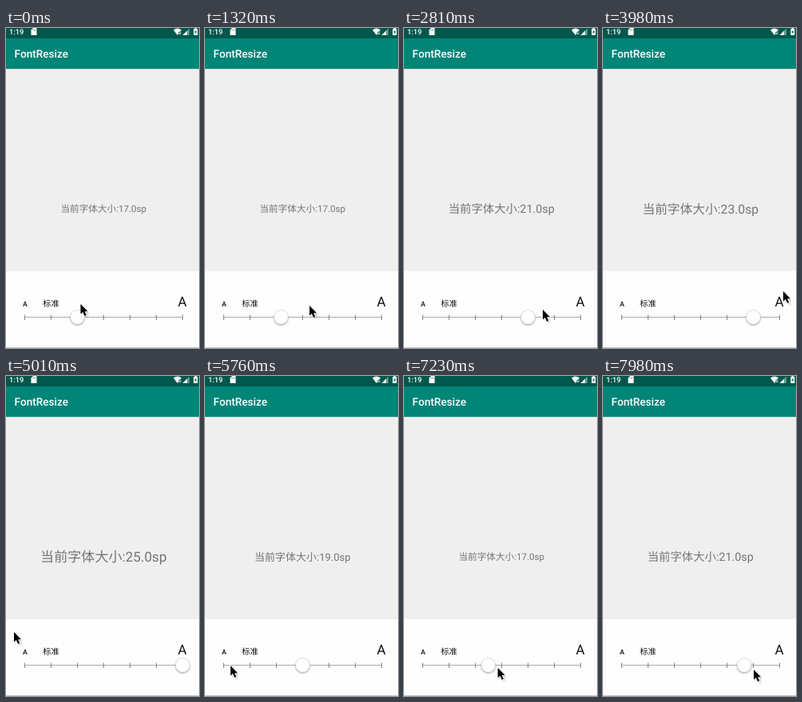
An HTML page for the animation above (8000 ms loop, 242x400 px).

```html
<!DOCTYPE html>
<html lang="zh-CN">
<head>
<meta charset="utf-8">
<title>FontResize</title>
<style>
html, body { margin: 0; width: 100%; height: 100%; overflow: hidden; background: #fefefe; }
svg { display: block; width: 242px; height: 400px; }
text { font-family: Roboto, "Noto Sans CJK SC", "Noto Sans CJK", sans-serif; text-rendering: geometricPrecision; }
</style>
</head>
<body>
<svg viewBox="0 0 242 400">
  <defs>
    <filter id="soft" x="-50%" y="-50%" width="200%" height="200%">
      <feGaussianBlur stdDeviation="0.9"/>
    </filter>
  </defs>
  <rect width="242" height="400" fill="#fefefe"/>
  <rect y="51" width="242" height="253" fill="#efefef"/>
  <rect y="51" width="242" height="1" fill="#dcdcdc"/>
  <rect y="13" width="242" height="38" fill="#008577"/>
  <rect width="242" height="13" fill="#00574b"/>
  <rect y="399" width="242" height="1" fill="#c8c8c8"/>

  <g fill="#fff">
    <text x="4" y="8" font-size="9.3" font-weight="500">1:19</text>
    <path d="M34 0H38.5V9H31.5V2.5Z"/>
    <path d="M33.8 1.6V3.2M35.4 1.6V3.2M37 1.6V3.2" stroke="#00574b" stroke-width=".6"/>
    <path d="M210 2.5Q215 -1.4 220 2.5L215 9Z"/>
    <path d="M216.7 5L219.7 8.5M219.7 5L216.7 8.5" stroke="#00574b" stroke-width="1.8"/>
    <path d="M217 5.4L219.4 8.2M219.4 5.4L217 8.2" stroke="#fff" stroke-width=".8"/>
    <path d="M221.5 9L230 .5V9Z" opacity=".4"/>
    <path d="M221.5 9L227 3.5V9Z"/>
    <path d="M235.3 1H236.6V0H239V1H240.3V9H235.3Z"/>
    <path d="M238.3 2.4L236.4 5.4H237.6V7.6L239.4 4.6H238.3Z" fill="#00574b"/>
    <text x="10.6" y="37" font-size="13.6" font-weight="500">FontResize</text>
  </g>

  <text id="label" x="122.3" text-anchor="middle" fill="#757575"></text>

  <g text-anchor="middle" fill="#111">
    <text x="24" y="348" font-size="8.8" font-weight="500">A</text>
    <text x="56.5" y="348" font-size="10.2">标准</text>
    <text x="221" y="348" font-size="17">A</text>
  </g>
  <g fill="none" stroke-width="1">
    <path id="line" stroke="#aaa"/>
    <path id="ticks" stroke="#858585"/>
  </g>
  <g id="thumb">
    <circle cy="1" r="9" opacity=".4" filter="url(#soft)"/>
    <circle r="8.8" fill="#fefefe" stroke="#d4d4d4" stroke-width=".5"/>
  </g>
  <g id="cursor">
    <path d="M1.5 1.5V14L4.5 12 7 17 9.5 16 7.5 11H11Z" opacity=".25" filter="url(#soft)"/>
    <path d="M0 0V12.6L2.9 10 5.1 15 7.2 14.1 5.1 9.2H9Z" stroke="#fff" stroke-width="1.6" paint-order="stroke"/>
  </g>
</svg>
<script>
const LOOP = 8000, STEP = 147.7;
const LEFT = 23.5, GAP = 33, STOPS = 7, AXIS = 361.5;
const MIN_SP = 13, PX_PER_SP = 0.684;
const SLIDE = 2, DRAG_OFFSET = 12;

const $ = id => document.getElementById(id);
const label = $('label'), thumb = $('thumb'), cursor = $('cursor');

const clamp = (v, lo, hi) => Math.min(hi, Math.max(lo, v));
const linear = f => f;
const easeOut = f => 1 - (1 - f) ** 3;
const easeInOut = f => (1 - Math.cos(Math.PI * f)) / 2;
const stopX = i => LEFT + GAP * i;
const place = (el, x, y) => el.setAttribute('transform', `translate(${x} ${y})`);

// Times below are counted in steps.
const hop = (from, to, x, y, ease = easeOut) => ({ from, to, x, y, ease });
const drag = hop(43, 54, 189, 367, linear);
const hops = [
  hop(0, 2, 102, 347), hop(4, 7, 131, 347), hop(11, 13, 163, 351),
  hop(17, 19, 174, 352), hop(23, 27, 226, 329), hop(29, 34, 10, 320),
  hop(35, 38, 32, 362), drag
];
const taps = [8.45, 14, 20, 28, 38];

function pointerAt(n) {
  let x = 93.5, y = 345;
  for (const h of hops) {
    const f = h.ease(clamp((n - h.from) / (h.to - h.from), 0, 1));
    x += (h.x - x) * f;
    y += (h.y - y) * f;
  }
  return { x, y };
}

// A tap slides the thumb to the nearest stop; a drag carries it along.
function sliderAt(n) {
  if (n >= drag.from) return Math.max(0, (pointerAt(n).x - DRAG_OFFSET - LEFT) / GAP);
  let stop = 2;
  for (const tap of taps) {
    const goal = clamp(Math.round((pointerAt(tap).x - LEFT) / GAP), 0, STOPS - 1);
    stop += (goal - stop) * easeInOut(clamp((n - tap) / SLIDE, 0, 1));
  }
  return stop;
}

function draw(ms) {
  const n = Math.floor((ms % LOOP + 12) / STEP);
  const stop = sliderAt(n), pointer = pointerAt(n);
  const sp = MIN_SP + 2 * Math.floor(stop + 1e-6);
  const size = sp * PX_PER_SP;
  label.textContent = `当前字体大小:${sp.toFixed(1)}sp`;
  label.setAttribute('font-size', size);
  label.setAttribute('y', Math.round(226.2 + size * 0.34));
  place(thumb, stopX(stop), AXIS);
  place(cursor, pointer.x, pointer.y);
}

$('line').setAttribute('d', `M${LEFT} ${AXIS}H${stopX(STOPS - 1)}`);
$('ticks').setAttribute('d', Array.from({ length: STOPS }, (_, i) => `M${stopX(i)} ${AXIS - 3}v6.5`).join(''));

const start = performance.now();
function tick() {
  draw(performance.now() - start);
  requestAnimationFrame(tick);
}
tick();
</script>
</body>
</html>
```
